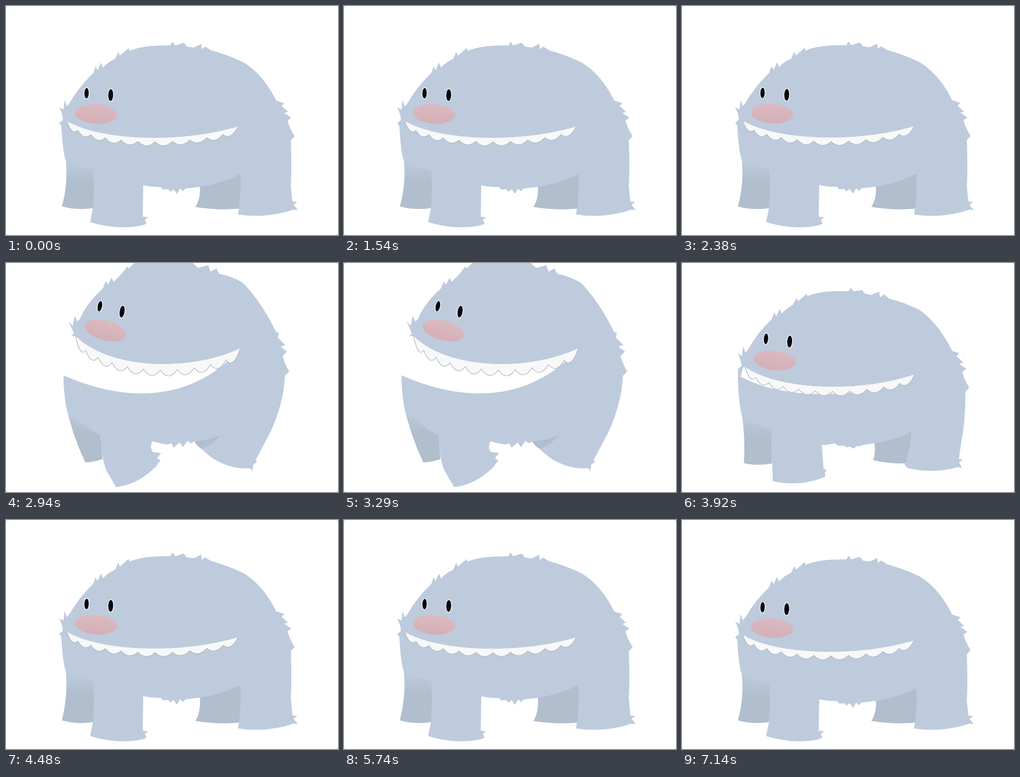
An HTML page for the animation above (7280 ms loop, 612x424 px).

```html
<!DOCTYPE html>
<html lang="en">
<head>
<meta charset="utf-8">
<title>Furry monster</title>
<style>
  html, body { margin: 0; width: 100%; height: 100%; overflow: hidden; background: #777; }
  svg { display: block; width: 612px; height: 424px; background: #fff; border-radius: 2px; }
  .fur { fill: #bdcbdc; }
  .shade { fill: #b0becd; }
  .white { fill: #fff; }
  .eye { fill: #05070d; stroke: #eef2f7; stroke-width: 3; paint-order: stroke; }
  #teeth { fill: #f8f8f9; }
  #teethEdge { fill: none; stroke: #b3bac4; stroke-width: 1.2; }
</style>
</head>
<body>
<svg viewBox="0 0 612 424">
  <defs>
    <linearGradient id="legShade" x2="0" y2="1">
      <stop offset=".1" stop-color="#bdcbdc"/><stop offset=".5" stop-color="#b0becd"/>
    </linearGradient>
    <linearGradient id="noseShade" x2="0" y2="1">
      <stop stop-color="#dcb9bf"/><stop offset="1" stop-color="#d3b0b7"/>
    </linearGradient>
  </defs>
  <path id="farLeft" fill="url(#legShade)"/>
  <path id="farRight" class="shade"/>
  <path id="body" class="fur"/>
  <path id="mouth" class="white"/>
  <path id="teeth"/>
  <path id="teethEdge"/>
  <ellipse id="eyeLeft" class="eye" rx="4" ry="9.8"/>
  <ellipse id="eyeRight" class="eye" rx="4.5" ry="11"/>
  <ellipse id="nose" fill="url(#noseShade)" rx="39" ry="18"/>
</svg>
<script>
const LOOP = 7280, STEP = 70, TEETH = 11, LIFT = 6;
const NUMBER = /-?\d+(\.\d+)?/g;
const $ = id => document.getElementById(id);

// Each part has a closed-mouth and an open-mouth pose with matching commands.
const backClosed = `M102 222 L98 217 L105 211 Q104 199 98 188 L106 192 L108 174 L112 186 L117 180
  Q134 150 161 124 L165 112 L169 119 L175 105 L179 114 Q187 104 201 98 L207 85 L210 92 L226 78 L228 83
  Q252 72 303 73 L307 66 L312 73 L328 68 L333 75 L346 77 L360 70 L361 80 L367 75 L378 82 Q408 90 437 104
  C466 121 486 150 498 175 L513 180 L508 185 L520 196 L513 198 L526 207 L519 212 Q522 225 532 241 L525 249`;
const backOpen = `M106 207 L118 137 L125 131 Q122 121 115 108 L123 116 L127 97 L131 108 L136 104
  Q150 72 178 48 L184 34 L188 40 L195 27 L198 35 Q207 27 214 19 L224 6 L226 10 L240 -3 L242 -1
  Q270 -12 318 -7 L322 -13 L327 -6 L344 -1 L347 3 L354 9 L373 4 L377 16 L388 10 L393 20 Q414 24 436 36
  C462 62 484 99 498 128 L503 129 L501 138 L515 152 L506 155 L518 164 L510 172 Q513 185 522 201 L514 209`;
const legsClosed = `Q527 300 525 335 L528 362 L537 363 L530 368 L538 378 L530 377 Q480 394 428 386 L428 384
  Q434 350 432 311 Q400 328 357 335 L331 338 L326 343 L321 338 L315 348 L309 339 L303 344 L299 339
  L290 340 L285 335 Q270 336 253 332 L252 390 L262 391 L256 396 L259 403 L252 406 Q205 416 155 400
  L160 376 Q163 350 161 303 Q130 300 109 283 Q104 262 102 222 Z`;
const legsOpen = `Q512 260 487 314 L460 365 L463 368 L456 373 L454 385 L450 380 Q415 383 380 361 L360 344
  Q385 335 396 317 Q380 328 348 330 L340 334 L335 329 L326 341 L320 332 L309 342 L305 334 L298 336
  L285 334 L270 330 Q264 342 271 350 L286 352 L278 361 L285 366 L279 372 L278 375 Q245 410 203 415
  L185 384 Q177 365 174 320 Q140 300 113 275 Q106 245 106 207 Z`;
const lip = ['M112 213 C180 252 330 253 428 223', 'M128 135 C190 198 340 202 432 158'];
const shapes = {
  farLeft: ['M109 275 Q116 325 103 371 Q130 379 162 374 L162 295 Z',
            'M110 262 Q121 315 146 369 Q160 369 178 363 L174 318 Z'],
  farRight: ['M357 330 Q360 355 349 372 Q390 379 434 375 L434 308 Z',
             'M346 328 Q352 340 362 345 Q372 356 385 358 L396 316 Z'],
  body: [backClosed + legsClosed, backOpen + legsOpen],
  mouth: [lip[0] + ' C330 253 180 252 112 213 L112 213 L112 213 Z',
          lip[1] + ' C350 252 230 264 104 207 L95 205 L115 136 Z']
};
const face = {
  eyeLeft: ['translate(148.5 161.5) rotate(2)', 'translate(173 80) rotate(11)'],
  eyeRight: ['translate(193 165) rotate(2)', 'translate(214 90) rotate(9)'],
  nose: ['translate(166 200) rotate(4)', 'translate(183 125) rotate(15)']
};

// Time/value pairs, eased between.
const breathKeys = [[0, 0], [350, 1], [490, 1], [910, 0], [980, 0], [1260, 1], [1540, 0], [1750, 0],
  [2070, 1], [2450, 0], [4130, 0], [4480, 1], [4620, 1], [5040, 0], [5180, 0], [5810, 1],
  [6230, 1], [6720, 0], [LOOP, 0]];
const openKeys = [[0, 0], [2590, 0], [2900, 1], [3640, 1], [4060, 0], [LOOP, 0]];

function track(keys, time) {
  const i = keys.findIndex(k => k[0] > time);
  const [t0, v0] = keys[i - 1], [t1, v1] = keys[i];
  const p = (time - t0) / (t1 - t0);
  return v0 + (v1 - v0) * p * p * (3 - 2 * p);
}

// Blends two poses; breathing lifts everything above the feet.
function mix([from, to], open, breath) {
  const target = to.match(NUMBER);
  let i = 0;
  return from.replace(NUMBER, n => {
    const lift = i % 2 && n < 350 ? LIFT * breath : 0;
    return (+n + (target[i++] - n) * open - lift).toFixed(2);
  });
}

// Hangs a row of scallops from a cubic curve.
function drawTeeth(curve, depth) {
  const c = curve.match(NUMBER).map(Number);
  const point = (u, drop) => {
    const v = 1 - u;
    const axis = k => v ** 3 * c[k] + 3 * v * v * u * c[k + 2] + 3 * v * u * u * c[k + 4] + u ** 3 * c[k + 6];
    return `${axis(0)} ${axis(1) + drop}`;
  };
  let edge = 'M' + point(0, 0);
  for (let i = 1; i <= TEETH; i++) {
    const valley = i === TEETH ? 0 : depth * 0.5;
    edge += ` Q${point((i - 0.5) / TEETH, depth * 1.5)} ${point(i / TEETH, valley)}`;
  }
  $('teethEdge').setAttribute('d', edge);
  $('teeth').setAttribute('d', `${edge} C${c[4]} ${c[5]} ${c[2]} ${c[3]} ${c[0]} ${c[1]} Z`);
}

function draw(now) {
  const time = Math.floor(now % LOOP / STEP) * STEP;
  const open = track(openKeys, time), breath = track(breathKeys, time);
  for (const id in shapes) $(id).setAttribute('d', mix(shapes[id], open, breath));
  for (const id in face) $(id).setAttribute('transform', mix(face[id], open, breath));
  drawTeeth(mix(lip, open, breath), 15 + 7 * open);
  requestAnimationFrame(draw);
}
requestAnimationFrame(draw);
</script>
</body>
</html>
```
